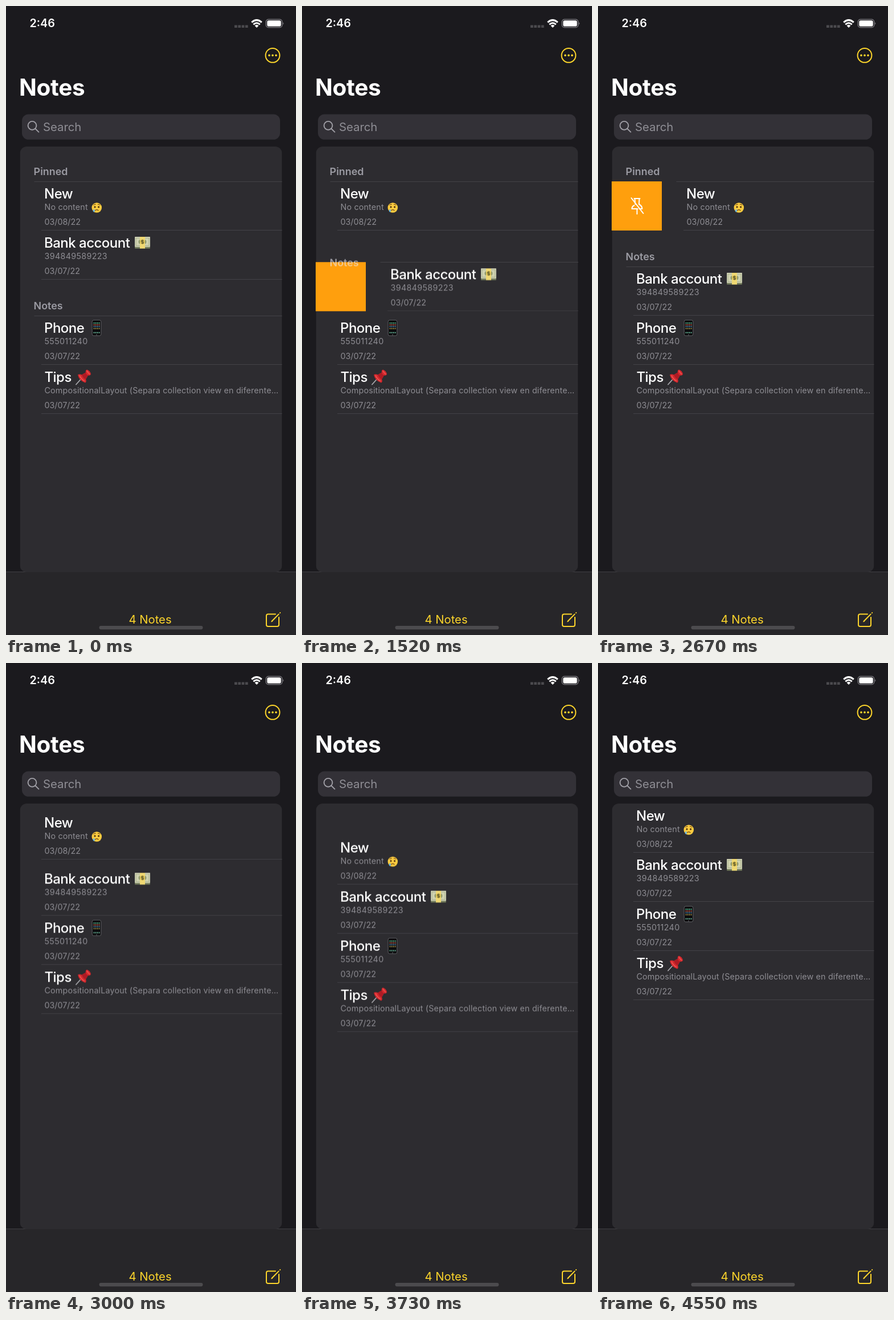
Animation of 509x1101 px, one loop 4730 ms. Source, as an HTML page:

```html
<!DOCTYPE html>
<html lang="en">
<head>
<meta charset="utf-8">
<title>Notes</title>
<style>
  html, body { margin: 0; width: 100%; height: 100%; overflow: hidden; background: #1b1a1e; }
  svg.stage { display: block; width: 100vw; height: 100vh; }
  text { font-family: Inter, Roboto, sans-serif; font-optical-sizing: none; fill: #fff; }

  .clock { font-size: 19.8px; font-weight: 600; }
  .large { font-size: 40.5px; font-weight: 700; letter-spacing: -.3px; }
  .field { font-size: 20.3px; fill: #8f8e95; }
  .count { font-size: 20.3px; fill: #fdd52b; text-anchor: middle; }
  .section { font-size: 17.9px; font-weight: 600; fill: rgba(235, 235, 245, .58); }
  .title { font-size: 24px; font-weight: 500; letter-spacing: -.52px; }
  .sub, .num, .date { font-size: 14.3px; fill: #8e8d93; letter-spacing: .17px; }
  .num { letter-spacing: .35px; }
  .date { letter-spacing: 0; }
  .rule { stroke: #434247; stroke-width: 1; }
  .gold { fill: none; stroke: #fdd52b; stroke-width: 2; stroke-linecap: round; stroke-linejoin: round; }

  /* One shared 4.73 s clock */
  .anim { animation: 4.73s linear infinite; }
  .scroll { animation-name: pull; }
  .new { animation-name: newMove; }
  .bank { animation-name: bankMove; }
  .rest { animation-name: restMove; }
  .heading { animation-name: headingMove; }
  .newSwipe { animation-name: newSwipe; }
  .bankSwipe { animation-name: bankSwipe; }
  .untilUnpin { animation-name: untilUnpin; animation-timing-function: step-end; }
  .untilMove { animation-name: untilMove; animation-timing-function: step-end; }
  .between { animation-name: between; animation-timing-function: step-end; }

  :root {
    --spring: linear(0, .18, .455, .671, .812, .897, .945, .971, .985, .992, 1);
  }

  @keyframes bankSwipe {
    0%, 24.93% { transform: translateX(0); }
    24.94%, 25.3% { transform: translateX(39.3px); animation-timing-function: ease-out; }
    27.36%, 32.77% { transform: translateX(88px); animation-timing-function: var(--spring); }
    46.72%, 100% { transform: translateX(0); }
  }
  @keyframes newSwipe {
    0%, 49.8% { transform: translateX(0); animation-timing-function: ease-out; }
    54.97%, 59.04% { transform: translateX(88px); }
    59.05%, 100% { transform: translateX(0); }
  }
  @keyframes bankMove {
    0%, 27.36% { transform: translateY(393px); animation-timing-function: ease-in-out; }
    33.7%, 59.05% { transform: translateY(456px); animation-timing-function: ease-in-out; }
    65.39%, 100% { transform: translateY(332px); }
  }
  @keyframes newMove {
    0%, 59.05% { transform: translateY(307px); animation-timing-function: ease-in-out; }
    65.39%, 100% { transform: translateY(246px); }
  }
  @keyframes restMove {
    0%, 59.05% { transform: translateY(542px); animation-timing-function: ease-in-out; }
    65.39%, 100% { transform: translateY(418px); }
  }
  @keyframes headingMove {
    0%, 27.36% { transform: translateY(531.3px); animation-timing-function: ease-in-out; }
    33.7%, 100% { transform: translateY(445.3px); }
  }
  @keyframes pull {
    0%, 73.5% { transform: translateY(0); animation-timing-function: cubic-bezier(.39, .575, .565, 1); }
    80.97%, 82.24% { transform: translateY(60px); animation-timing-function: var(--spring); }
    96.19%, 100% { transform: translateY(0); }
  }
  @keyframes untilUnpin { 0% { opacity: 1; } 59.05%, 100% { opacity: 0; } }
  @keyframes untilMove { 0% { opacity: 1; } 27.36%, 100% { opacity: 0; } }
  @keyframes between { 0% { opacity: 0; } 27.36% { opacity: 1; } 59.05%, 100% { opacity: 0; } }
</style>
</head>
<body>
<svg class="stage" viewBox="0 0 509 1101">
  <defs>
    <clipPath id="card"><rect x="24.5" y="246" width="460" height="745" rx="12"/></clipPath>
    <rect id="action" x="-64" y="0" width="88" height="86" fill="#ff9f0d"/>
    <g id="unpin" transform="translate(-19.5 43)" fill="none" stroke="#fff" stroke-width="2" stroke-linecap="round" stroke-linejoin="round">
      <path d="M-5-13H5M-4-13L-3-3M4-13L3.5-3Q9 0 9 5H4M-5-1Q-9 1-9 5H1M0 5V14M-10-14L11 13"/>
    </g>
    <path id="bottom" class="rule" d="M62 85.5H484.5"/>
    <path id="top" class="rule" d="M49.5 .5H484.5"/>

    <g id="tear">
      <circle r="8.8" fill="#fbcb3f"/>
      <circle cx="-3.3" cy="-1.2" r="1.6" fill="#4e3210"/>
      <circle cx="3.3" cy="-1.2" r="1.6" fill="#4e3210"/>
      <path d="M-5.5-4.6Q-4-6-2-5.6M5.5-4.6Q4-6 2-5.6M-2.8 5Q0 2.4 2.8 5" fill="none" stroke="#6b4515" stroke-width="1.1" stroke-linecap="round"/>
      <path d="M-4.8 1.8Q-7.6 6-5.6 7.4Q-3.2 7.8-3.4 5.4Z" fill="#5db7ee"/>
    </g>
    <g id="cash">
      <rect x="-13.3" y="-8" width="26.6" height="18" fill="#77805f"/>
      <rect x="-13.3" y="-10.5" width="26.6" height="17.5" fill="#dcdec2"/>
      <rect x="-12" y="-9" width="24" height="14.5" fill="#a3ab88"/>
      <rect x="-11" y="-8" width="22" height="12.5" fill="#cfd2b0"/>
      <ellipse cy="-1.7" rx="7" ry="5.4" fill="#8c986c"/>
      <rect x="-4.5" y="-10.5" width="9" height="20.5" fill="#efd873"/>
      <circle cy="-1.7" r="4.2" fill="#d9bd52"/>
      <path d="M2-4Q-2-5-2-3T0-1.7T2-.2T-2 .6M0-5.3V2" fill="none" stroke="#5c5a2d" stroke-width="1.1"/>
    </g>
    <g id="mobile">
      <rect x="-7.8" y="-13.6" width="15.6" height="27.2" rx="2.6" fill="#0b0b0d" stroke="#68686d" stroke-width=".9"/>
      <g fill="none" stroke-width="1.9" stroke-dasharray="1.9 1.2">
        <path d="M-5.4-8.5H5.6" stroke="#58b98e"/>
        <path d="M-5.4-5.3H5.6" stroke="#d26b58"/>
        <path d="M-5.4-2.1H5.6" stroke="#5a9dcc"/>
        <path d="M-5.4 1.1H5.6" stroke="#bda653"/>
        <path d="M-5.4 8.3H5.6" stroke="#6cbfa0"/>
      </g>
      <circle cy="11.9" r="1" fill="#55555a"/>
    </g>
    <g id="pushpin">
      <path d="M-13 13L-4 3" stroke="#a9a9ae" stroke-width="1.8" stroke-linecap="round"/>
      <path d="M-10-4Q-7-6-3-4L4-8Q3-12 6-13Q12-11 13-5Q12-2 8-3L4 4Q6 8 3 10Q-8 6-10-4Z" fill="#d5282d"/>
      <path d="M-3-4L4-8Q5-4 8-3L4 4Q-1 2-3-4Z" fill="#ad1b24"/>
      <path d="M-7-3Q-4 4 2 7M6-11Q8-7 11-5" fill="none" stroke="#f0605c" stroke-width="1.3"/>
    </g>
  </defs>

  <rect width="509" height="1101" fill="#1b1a1e"/>

  <!-- Status bar -->
  <text class="clock" x="41.4" y="37.4">2:46</text>
  <path d="M401 35.8H425" stroke="#4b4a4e" stroke-width="4.6" stroke-dasharray="4.8 1.5"/>
  <g fill="none" stroke="#fff" stroke-width="3">
    <path d="M431.2 28.6Q440 20.6 448.8 28.6"/>
    <path d="M434.3 32.3Q440 27.3 445.7 32.3"/>
  </g>
  <path d="M436.6 34.4Q440 31.6 443.4 34.4L440 38Z" fill="#fff"/>
  <rect x="456.3" y="23.3" width="28.4" height="14.4" rx="4.4" fill="none" stroke="#858489" stroke-width="1.2"/>
  <rect x="458.3" y="25.3" width="24.4" height="10.4" rx="2.8" fill="#fff"/>
  <path d="M486.2 28.2Q488.4 30.5 486.2 32.8Z" fill="#858489"/>

  <!-- Navigation -->
  <circle class="gold" cx="468" cy="86.4" r="12.4"/>
  <g fill="#fdd52b">
    <circle cx="462" cy="86.4" r="1.8"/><circle cx="468" cy="86.4" r="1.8"/><circle cx="474" cy="86.4" r="1.8"/>
  </g>
  <text class="large" x="22.9" y="157.2">Notes</text>
  <rect x="28" y="189.5" width="453" height="44.3" rx="11.5" fill="#333137"/>
  <g fill="none" stroke="#a09fa6" stroke-width="1.9" stroke-linecap="round">
    <circle cx="46" cy="209.3" r="7.4"/><path d="M51.4 214.7L57.4 220.6"/>
  </g>
  <text class="field" x="65" y="218.5">Search</text>

  <!-- Toolbar -->
  <rect y="990" width="509" height="111" fill="#272629"/>
  <path d="M0 990.5H509" stroke="#414044"/>

  <!-- List -->
  <g clip-path="url(#card)">
    <rect x="24.5" y="246" width="460" height="745" fill="#2d2c30"/>
    <g class="anim scroll">
      <g class="anim new">
        <g class="anim newSwipe">
          <use href="#action"/><use href="#unpin"/>
          <use href="#top" class="anim untilUnpin"/>
          <text class="title" x="67" y="29.9">New</text>
          <text class="sub" x="67.5" y="50.3">No content</text>
          <use href="#tear" x="159.3" y="46"/>
          <text class="date" x="67.5" y="76.2">03/08/22</text>
          <use href="#bottom"/>
        </g>
      </g>
      <g class="anim rest">
        <use href="#top" class="anim untilMove"/>
        <text class="title" x="67" y="29.9">Phone</text>
        <use href="#mobile" x="159" y="21.5"/>
        <text class="num" x="67.5" y="50.3">555011240</text>
        <text class="date" x="67.5" y="76.2">03/07/22</text>
        <use href="#bottom"/>
        <g transform="translate(0 86)">
          <text class="title" x="67.4" y="29.9">Tips</text>
          <use href="#pushpin" x="136" y="21.5"/>
          <text class="sub" x="67.5" y="50.3">CompositionalLayout (Separa collection view en diferente…</text>
          <text class="date" x="67.5" y="76.2">03/07/22</text>
          <use href="#bottom"/>
        </g>
      </g>
      <g class="anim bank">
        <g class="anim bankSwipe">
          <use href="#action"/><use href="#unpin" class="anim untilMove"/>
          <use href="#top" class="anim between"/>
          <text class="title" x="67" y="29.9">Bank account</text>
          <use href="#cash" x="239.5" y="21.5"/>
          <text class="num" x="67.5" y="50.3">394849589223</text>
          <text class="date" x="67.5" y="76.2">03/07/22</text>
          <use href="#bottom"/>
        </g>
      </g>
      <g class="anim untilUnpin">
        <text class="section" x="48.6" y="296.3">Pinned</text>
        <text class="section anim heading" x="48.6" y="0">Notes</text>
      </g>
    </g>
  </g>

  <text class="count" x="253" y="1081.3">4 Notes</text>
  <path class="gold" d="M473 1064.5H460Q457 1064.5 457 1067.5V1083Q457 1086 460 1086H476Q479 1086 479 1083V1070M467 1076.5L478.6 1064.6M481 1062.2L481.2 1062"/>
  <path d="M465 1078.6L466.2 1075.4L468.2 1077.4Z" fill="#fdd52b"/>
  <rect x="163.5" y="1085" width="182" height="6.2" rx="3.1" fill="#4c4b4e"/>
</svg>
</body>
</html>
```
